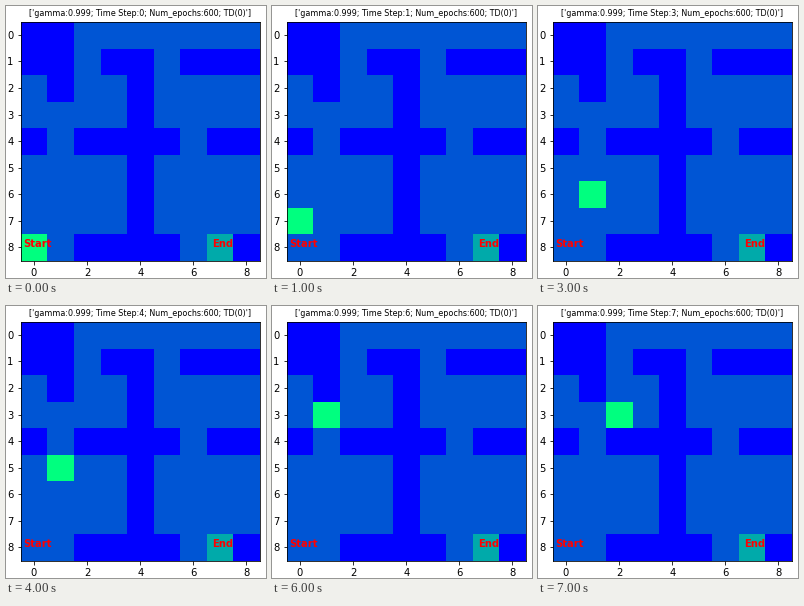
These frames come from a looping animation (260 by 272 pixels, 8000 ms). A matplotlib script:

```python
import numpy as np
import matplotlib.pyplot as plt
from matplotlib.animation import FuncAnimation

W, H, DPI = 260, 272, 72
LEFT, TOP, SIDE = 14.7, 15.6, 239

plt.rcParams.update({"font.family": "DejaVu Sans", "font.size": 10})

MAZE = [
    "##.......",
    "##.##.###",
    ".#..#....",
    "....#....",
    "#.####.##".replace("####.", "####."),
    "....#....",
    "....#....",
    "....#....",
    "..####.E#",
]
VALUES = {"#": 0, ".": 1, "E": 2}
AGENT = 3

# (row, column) of the agent at each time step
PATH = [(8, 0), (7, 0), (6, 0), (6, 1), (5, 1), (4, 1), (3, 1), (3, 2)]

grid = np.array([[VALUES[c] for c in row] for row in MAZE])

fig = plt.figure(figsize=(W / DPI, H / DPI), dpi=DPI, facecolor="white")
ax = fig.add_axes([LEFT / W, 1 - (TOP + SIDE) / H, SIDE / W, SIDE / H])
image = ax.imshow(grid, cmap="winter", vmin=0, vmax=AGENT,
                  interpolation="nearest", aspect="auto")
ax.set_xticks(range(0, 9, 2))
ax.set_yticks(range(9))
title = ax.set_title("", fontsize=8)

for x, label in ((-0.4, "Start"), (6.7, "End")):
    ax.text(x, 8, label, color="red", weight="bold", va="baseline")


def update(step):
    state = grid.copy()
    state[PATH[step]] = AGENT
    image.set_data(state)
    title.set_text(f"['gamma:0.999; Time Step:{step}; Num_epochs:600; TD(0)']")
    return image, title


anim = FuncAnimation(fig, update, frames=len(PATH), interval=1000,
                     repeat=True, repeat_delay=0)
plt.show()
```
